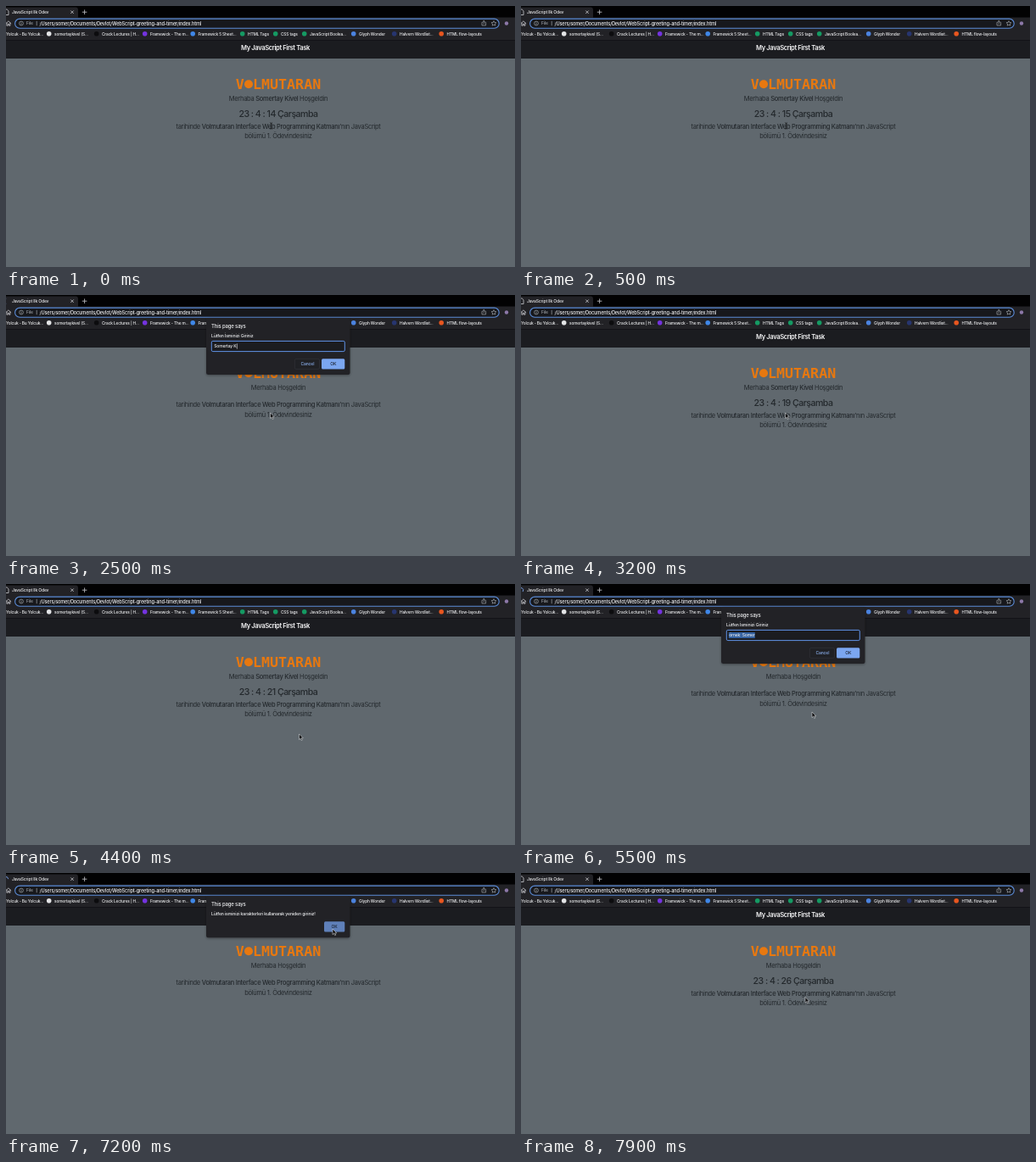
Animation of 600x308 px, one loop 8 s. Source, as an HTML page:

```html
<!DOCTYPE html>
<html lang="tr">
<head>
<meta charset="utf-8">
<title>JavaScript Ilk Odev</title>
<style>
  html, body { margin: 0; width: 100%; height: 100%; overflow: hidden; background: #60686e; }
  svg { display: block; width: 100vw; height: 100vh; }
  text { font-family: Inter, "Noto Sans", sans-serif; white-space: pre; letter-spacing: -.03em; }
  .page text { letter-spacing: -.038em; text-anchor: middle; fill: #23282c; font-size: 7.5px; }
  .page .logo { font: bold 16.7px "DejaVu Sans Mono", monospace; letter-spacing: 0; text-anchor: start; fill: #e8780f; }
  .page .clock { font-size: 10.6px; font-weight: 500; letter-spacing: -.05em; }
  .page .title { font-size: 7.6px; font-weight: 600; letter-spacing: -.05em; fill: #f4f4f5; }
  .b { font-weight: 500; }
  .ui text { font-size: 5px; font-weight: 500; fill: #eeeff1; }
  .ui .mark text { font-size: 4.8px; }
  .ui .head { font-size: 6px; }
  .ui .msg { font-size: 5.2px; }
  .ui .btn { text-anchor: middle; }
  .line { fill: none; stroke: #c9cbd0; stroke-width: .8; stroke-linecap: round; stroke-linejoin: round; }
</style>
</head>
<body>
<svg viewBox="0 0 600 308" preserveAspectRatio="none">
  <defs>
    <filter id="shade" x="-10%" y="-10%" width="120%" height="130%">
      <feDropShadow dx="0" dy="1" stdDeviation="1.5" flood-opacity=".35"/>
    </filter>
  </defs>

  <g class="page">
    <rect width="600" height="308" fill="#60686e"/>
    <rect y="40" width="600" height="22" fill="#1b1c20"/>
    <text class="title" x="317.5" y="51.8">My JavaScript First Task</text>
    <text class="logo" x="270.8" y="98.4">V LMUTARAN</text>
    <circle cx="286" cy="92.3" r="5" fill="#e8780f"/>
    <text x="321" y="111.6">Merhaba <tspan class="b" id="name"></tspan>Hoşgeldin</text>
    <text class="clock" id="clock" x="321" y="131.4"></text>
    <g id="info">
      <text x="321" y="132">tarihinde <tspan class="b">Volmutaran Interface Web Programming Katmanı</tspan>'nın JavaScript</text>
      <text x="321" y="143.7">bölümü 1. Ödevindesiniz</text>
    </g>
  </g>

  <g class="ui">
    <rect width="600" height="14" fill="#020203"/>
    <path d="M0 1.5H82Q85 1.5 85 4.5V14H0Z" fill="#222226"/>
    <rect y="13.5" width="600" height="26.8" fill="#222226"/>
    <rect y="40" width="600" height=".8" fill="#101014"/>
    <text x="7" y="9">JavaScript Ilk Odev</text>
    <path class="line" d="M76.5 5.7l3 3m0-3l-3 3M90.2 7.2h4.8m-2.4-2.4v4.8"/>
    <path class="line" id="doc" d="M-1 4h2.2l1.8 1.8V10.5H-1"/>
    <path class="line" id="spin" d="M0-2.9A2.9 2.9 0 0 1 0 2.9" style="stroke:#7fa9f2"/>
    <path class="line" d="M0 20.6l2.9-2.8 2.9 2.8M.9 20v3.2h1.3v-2h1.4v2h1.3V20"/>

    <rect x="10.6" y="15.1" width="570.6" height="11.2" rx="5.6" fill="#17181c" stroke="#5b8cd8" stroke-width="1.1"/>
    <g fill="none" stroke="#a3a6ab" stroke-width=".7">
      <circle cx="18" cy="20.5" r="2.4"/>
      <path d="M18 20v1.8M18 18.9v.5M36.2 17.8v5.4M562 19.3h-1v3.6h4.6v-3.6h-1M563.3 21.3v-4m-1.3 1.2l1.3-1.2 1.3 1.2"/>
      <path d="M575 17.6l.9 1.9 2 .2-1.5 1.4.4 2-1.8-1-1.8 1 .4-2-1.5-1.4 2-.2z"/>
    </g>
    <text x="24" y="22.4" style="fill:#9da0a6">File</text>
    <text x="39.6" y="22.5" style="font-size:5.62px">/Users/somer/Documents/Devlot/WebScript-greeting-and-timer/index.html</text>
    <circle cx="590" cy="20.5" r="2.2" fill="#8c78a8"/>
    <g class="mark" id="marks"></g>

    <g id="dialog">
      <rect id="panel" x="236" y="27" width="169.5" height="67" rx="2.5" fill="#202125" filter="url(#shade)"/>
      <text class="head" x="242" y="38.8">This page says</text>
      <text class="msg" id="msg" x="242" y="49.6"></text>
      <g id="field">
        <rect x="242.3" y="54.4" width="157" height="12.2" rx="1.5" fill="#1b1c20" stroke="#5f92e6"/>
        <rect id="pick" x="244.8" y="57" width="28.5" height="7" fill="#33609f"/>
        <text id="input" x="245.2" y="62.2"></text>
        <rect id="caret" y="57.3" width=".6" height="6.4" fill="#f0f0f2"/>
        <rect x="340.4" y="75.4" width="29" height="12" rx="1.5" fill="#202125" stroke="#34363b" stroke-width=".6"/>
        <text class="btn" x="355.4" y="83.2" style="fill:#8db3f3">Cancel</text>
      </g>
      <g id="ok">
        <rect id="okBox" y="75.2" height="12.4" rx="1.5"/>
        <text class="btn" id="okText" y="83.3" style="fill:#1b2230">OK</text>
      </g>
    </g>
  </g>

  <g id="mouse">
    <path id="arrow" d="M0 0V6.6L1.6 5.2 2.7 7.6 3.8 7.1 2.7 4.8H4.8Z" fill="#0c0c0e" stroke="#dfe2e4" stroke-width=".55"/>
    <path id="beam" d="M-.4-1.2Q1-1.2 1 0V5Q1 6.2-.4 6.2M2.4-1.2Q1-1.2 1 0M1 5Q1 6.2 2.4 6.2" fill="none" stroke="#17191b" stroke-width=".8"/>
  </g>
</svg>
<script>
const LOOP = 8000, STEP = 100;
const PERSON = "Somertay Kivel";
const $ = id => document.getElementById(id);
const show = (id, on) => $(id).style.display = on ? "" : "none";
const within = (t, ...spans) => spans.some(([a, b]) => t >= a && t < b);
const set = (id, attrs) => { for (const k in attrs) $(id).setAttribute(k, attrs[k]); };
const write = (id, s) => { if ($(id).textContent !== s) $(id).textContent = s; };

// label, text x, icon colour
const bookmarks = [
  ["Yolcuk - Bu Yolcuk...", 0],
  ["somertaykivel (S...", 57, "#e3e4e6"],
  ["Crack Lectures | H...", 113, "#0c0c0e"],
  ["Framewick - The m...", 170, "#7433e0"],
  ["Framewick 5 Sheet...", 226.5, "#3f87e8"],
  ["HTML Tags", 285, "#159a63"],
  ["CSS tags", 324, "#159a63"],
  ["JavaScript Boolea...", 358, "#159a63"],
  ["Glyph Wonder", 416, "#4b83e0"],
  ["Halvern Wordlist...", 464, "#27356f"],
  ["HTML flow-layouts", 519.5, "#e8561f"]
];
$("marks").innerHTML = bookmarks.map(([label, x, color]) =>
  (color ? `<circle cx="${x - 6.3}" cy="32.8" r="2.8" fill="${color}"/>` : "") +
  `<text x="${x}" y="34.6">${label}</text>`).join("");

// time, seconds shown (null: line is empty)
const ticks = [[0, 14], [500, 15], [700, null], [3100, 19], [3700, 20],
  [4400, 21], [4900, null], [7400, 25], [7700, 26]];

// time, pointer x, pointer y
const path = [[0, 311.5, 139], [3600, 311.5, 139], [4200, 345.5, 177], [4800, 345.5, 177],
  [5200, 343, 151], [5500, 343, 151], [5600, 383, 79], [5700, 385, 79], [6200, 385, 79],
  [6500, 385, 66], [7400, 385, 66], [7900, 335, 146.5], [8000, 335, 146.5]];

function pointer(t) {
  const i = path.findIndex(p => p[0] > t);
  const [t0, x0, y0] = path[i - 1], [t1, x1, y1] = path[i];
  const k = (t - t0) / (t1 - t0);
  return [x0 + (x1 - x0) * k, y0 + (y1 - y0) * k];
}

function drawPage(t) {
  const sec = ticks.filter(p => p[0] <= t).pop()[1];
  write("clock", sec === null ? "" : `23 : 4 : ${sec} Çarşamba`);
  set("info", { transform: `translate(0 ${sec === null ? 0 : 12.8})` });
  write("name", within(t, [0, 700], [3000, 4900]) ? PERSON + " " : "");
}

function drawDialog(t) {
  const ask = within(t, [1000, 3000], [5100, 6200]);
  const warn = within(t, [6300, 7300]);
  show("dialog", ask || warn);
  show("field", ask);
  if (!ask && !warn) return;

  write("msg", warn ? "Lütfen isminizi karakterleri kullanarak yeniden giriniz!" : "Lütfen İsminizi Giriniz");
  set("panel", { height: warn ? 49.2 : 67 });
  set("ok", { transform: `translate(0 ${warn ? -18 : 0})` });
  set("okBox", { x: warn ? 375 : 372, width: warn ? 24.3 : 27.3, fill: warn && t >= 6500 ? "#5f80b9" : "#7ba6f0" });
  set("okText", { x: warn ? 387 : 385.7 });

  const typing = within(t, [1600, 3000]);
  const count = Math.floor((t - 1600) / STEP) + 1;
  write("input", typing ? PERSON.slice(0, count) : "örnek: Somer");
  show("pick", ask && !typing);
  show("caret", typing);
  if (typing) set("caret", { x: 245.6 + $("input").getComputedTextLength() });
  else if (ask) set("pick", { width: $("input").getComputedTextLength() + .6 });
}

function drawTab(t) {
  const busy = within(t, [700, 3100], [4900, 7400]);
  show("spin", busy);
  show("doc", !busy);
  set("spin", { transform: `translate(-.2 7.3) rotate(${t * .4 % 360 - 100})` });
}

function frame(now) {
  const t = Math.floor(now % LOOP / STEP) * STEP;
  drawPage(t);
  drawDialog(t);
  drawTab(t);
  set("mouse", { transform: `translate(${pointer(t)})` });
  show("beam", t < 700);
  show("arrow", t >= 700);
  requestAnimationFrame(frame);
}
frame(performance.now());
</script>
</body>
</html>
```
